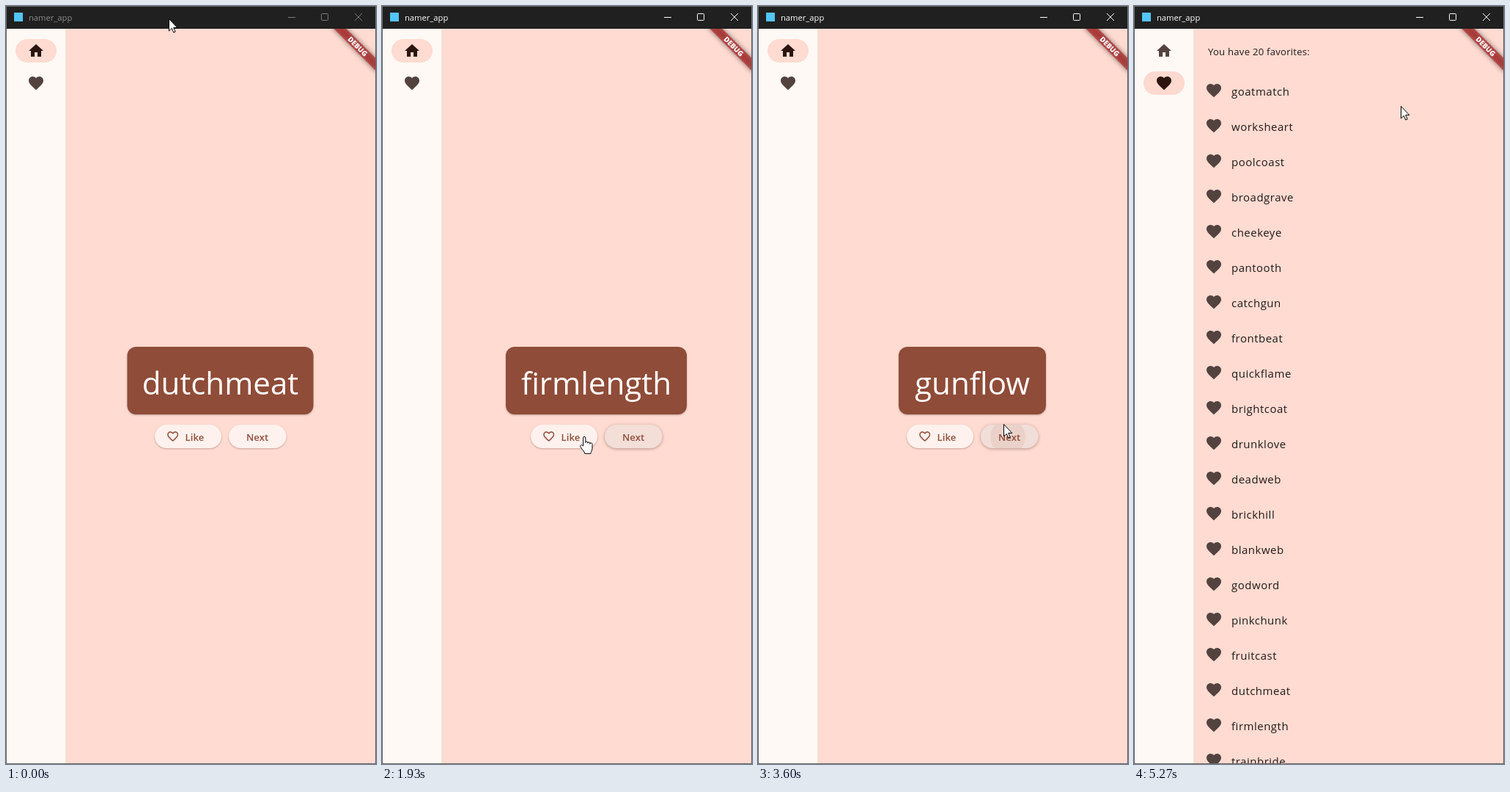
An HTML page for the animation above (7870 ms loop, 505 by 1032 pixels).

```html
<!DOCTYPE html>
<html lang="en">
<head>
<meta charset="utf-8">
<title>namer_app</title>
<style>
  html, body { margin: 0; width: 100%; height: 100%; overflow: hidden; background: #ffdbd1; }
  svg { display: block; width: 505px; height: 1032px; font-family: "Open Sans", "Noto Sans", sans-serif; }
  .btn { fill: #fff1ed; }
  .label { font-size: 13.1px; font-weight: 600; letter-spacing: .1px; fill: #8f4c38; }
  .item { font-size: 15px; letter-spacing: .5px; fill: #231917; }
  .cursor { fill: #fff; stroke: #000; stroke-width: 1; stroke-linejoin: round; }
</style>
</head>
<body>
<svg viewBox="0 0 505 1032" xmlns="http://www.w3.org/2000/svg">
  <defs>
    <path id="heart" d="M12 21.35l-1.45-1.32C5.4 15.36 2 12.28 2 8.5 2 5.42 4.42 3 7.5 3c1.74 0 3.41.81 4.5 2.09C13.09 3.81 14.76 3 16.5 3 19.58 3 22 5.42 22 8.5c0 3.78-3.4 6.86-8.55 11.54z"/>
    <path id="heartLine" d="M16.5 3c-1.74 0-3.41.81-4.5 2.09C10.91 3.81 9.24 3 7.5 3 4.42 3 2 5.42 2 8.5c0 3.78 3.4 6.86 8.55 11.54L12 21.35l1.45-1.32C18.6 15.36 22 12.28 22 8.5 22 5.42 19.58 3 16.5 3zm-4.4 15.55l-.1.1-.1-.1C7.14 14.24 4 11.39 4 8.5 4 6.5 5.5 5 7.5 5c1.54 0 3.04.99 3.57 2.36h1.87C13.46 5.99 14.96 5 16.5 5c2 0 3.5 1.5 3.5 3.5 0 2.89-3.14 5.74-7.9 10.05z"/>
    <filter id="soft" x="-50%" y="-200%" width="200%" height="500%"><feGaussianBlur stdDeviation="3.9"/></filter>
    <clipPath id="app"><rect x="1" y="31" width="503" height="1000"/></clipPath>
  </defs>

  <rect width="505" height="1032" fill="#ffdbd1"/>
  <rect x="1" y="30" width="80" height="1001" fill="#fff9f5"/>

  <rect id="homePill" x="13" y="45" width="56" height="32" rx="16" fill="#ffdbd1"/>
  <rect id="favPill" x="13" y="89" width="56" height="32" rx="16" fill="#ffdbd1"/>
  <g id="favInk"></g>
  <path id="homeIcon" transform="translate(29 49)" d="M10 20v-6h4v6h5v-8h3L12 3 2 12h3v8z"/>
  <use id="favIcon" href="#heart" x="29" y="93"/>

  <g id="homePage">
    <rect id="card" y="464" height="92" rx="12" fill="#8f4c38" style="filter:drop-shadow(0 1px 1px rgba(0,0,0,.28))"/>
    <text id="word" x="292.5" y="529" text-anchor="middle" font-size="42.1" fill="#fff"></text>
    <rect id="likeBtn" class="btn" x="203" y="570" width="91" height="32" rx="16"/>
    <rect id="nextBtn" class="btn" x="304" y="570" width="78.5" height="32" rx="16"/>
    <g id="likeInk"></g>
    <g id="nextInk"></g>
    <use id="likeIcon" transform="translate(218.7 577) scale(.75)" fill="#8f4c38"/>
    <text class="label" x="244.5" y="592">Like</text>
    <text class="label" x="328" y="592">Next</text>
  </g>

  <g id="favPage" clip-path="url(#app)">
    <text x="101" y="67" font-size="13.1" letter-spacing=".25" fill="#231917">You have 20 favorites:</text>
  </g>

  <g clip-path="url(#app)">
    <g transform="translate(504 31) rotate(45)">
      <rect x="-44" y="28" width="88" height="12" fill="#000" opacity=".5" filter="url(#soft)"/>
      <rect x="-44" y="28" width="88" height="12" fill="#b71c1c" opacity=".63"/>
      <text y="37.5" text-anchor="middle" font-size="9.7" font-weight="800" fill="#fff">DEBUG</text>
    </g>
  </g>

  <rect width="505" height="31" fill="#202020"/>
  <rect x="11" y="9" width="12" height="12" fill="#54c5f8"/>
  <text id="title" x="31" y="20" font-size="11.2">namer_app</text>
  <path id="controls" fill="none" d="M385 15.5h10M431.5 10.5h7a1 1 0 0 1 1 1v7a1 1 0 0 1-1 1h-7a1 1 0 0 1-1-1v-7a1 1 0 0 1 1-1zM476 10l10 10M486 10l-10 10"/>
  <rect x=".5" y=".5" width="504" height="1031" fill="none" stroke="#686868"/>

  <path id="arrow" class="cursor" d="M.5.5V17l3.8-3.6 2.5 5.7 2.4-1.1-2.5-5.5h5.1z"/>
  <path id="hand" class="cursor" d="M-1.4 13V2a1.6 1.6 0 0 1 3.2 0v6.4a1.5 1.5 0 0 1 3 .2v.6a1.5 1.5 0 0 1 3 .3v.8a1.6 1.6 0 0 1 3.2.3V16c0 3-1.6 4-2.2 7.4H.9C.3 20.300-3 17.800-5 14.400-6 12.500-4 10.800-2.800 12z"/>
</svg>
<script>
const LOOP = 7870, STEP = 200 / 3, LAST = 79;
const $ = id => document.getElementById(id);
const clamp = v => Math.max(0, Math.min(1, v));

function add(parent, tag, attrs, text) {
  const el = document.createElementNS('http://www.w3.org/2000/svg', tag);
  set(el, attrs);
  if (text) el.textContent = text;
  parent.append(el);
  return el;
}
function set(el, attrs) {
  for (const k in attrs) el.setAttribute(k, attrs[k]);
}
const show = (el, on) => el.style.display = on ? '' : 'none';

// Pointer path: step, x, y
const path = [
  [3, 222, 17], [5, 223, 40], [7, 226, 190], [9, 232, 430], [11, 238, 610], [12, 240, 630],
  [13, 242, 618], [14, 242, 601], [15, 243, 599], [16, 245, 591], [19, 246, 589], [20, 268, 588],
  [21, 298, 588], [22, 322, 587], [24, 338, 586], [28, 336, 586], [29, 276, 586], [30, 258, 586],
  [31, 274, 585], [32, 306, 583], [33, 313, 581], [35, 317, 580], [36, 315, 582], [37, 300, 584],
  [39, 262, 585], [42, 252, 583], [43, 262, 572], [44, 301, 503], [46, 325, 330], [47, 330, 285],
  [48, 330, 285], [50, 338, 530], [51, 340, 584], [53, 340, 587], [55, 330, 550], [58, 255, 310],
  [61, 152, 137], [63, 97, 102], [65, 56, 102], [66, 47, 104], [72, 45, 106], [75, 62, 108],
  [76, 120, 112], [77, 235, 123], [78, 335, 133], [79, 364, 136]
];
const words = [[0, 'dutchmeat', 254], [25, 'firmlength', 247], [35, 'trainbride', 233], [53, 'gunflow', 201]];
const liked = [[18, 25], [31, 35], [42, 53]];
const ACTIVE = 17, FAVORITES = 70;

const zones = {
  like: { x: 203, y: 570, w: 91, clicks: [17, 30, 41] },
  next: { x: 304, y: 570, w: 78.5, clicks: [24, 35, 53] },
  fav: { x: 13, y: 89, w: 56, clicks: [69] }
};

for (const id in zones) {
  const z = zones[id], g = $(id + 'Ink');
  const box = { x: z.x, y: z.y, width: z.w, height: 32, rx: 16 };
  add(add(g, 'clipPath', { id: id + 'Clip' }), 'rect', box);
  z.tint = add(g, 'rect', { ...box, fill: '#8f4c38' });
  z.ripple = add(add(g, 'g', { 'clip-path': `url(#${id}Clip)` }), 'circle', { fill: '#8f4c38' });
}

const favorites = ('goatmatch worksheart poolcoast broadgrave cheekeye pantooth catchgun frontbeat ' +
  'quickflame brightcoat drunklove deadweb brickhill blankweb godword pinkchunk fruitcast ' +
  'dutchmeat firmlength trainbride').split(' ');
favorites.forEach((name, i) => {
  add($('favPage'), 'use', { href: '#heart', x: 97, y: 103 + 48 * i, fill: '#53433f' });
  add($('favPage'), 'text', { class: 'item', x: 133, y: 122 + 48 * i }, name);
});

function pointer(n) {
  if (n <= path[0][0]) return path[0].slice(1);
  const i = path.findIndex(p => p[0] >= n);
  const [a, ax, ay] = path[i - 1], [b, bx, by] = path[i];
  const k = (n - a) / (b - a);
  return [Math.round(ax + (bx - ax) * k), Math.round(ay + (by - ay) * k)];
}

function over(id, n) {
  const [x, y] = pointer(n), z = zones[id];
  if (id === 'fav') return x < 81 && y > 85 && y < 130;
  return n < FAVORITES && x >= z.x && x <= z.x + z.w && y >= z.y && y <= z.y + 32;
}

function drawInk(id, n) {
  const z = zones[id];
  const hover = [1, 2, 3, 4].filter(d => over(id, n - d)).length / 4;
  const click = z.clicks.filter(c => c <= n).pop() ?? -99;
  const age = n - click;
  const press = clamp(1 - age / 8);
  set(z.tint, { opacity: .07 * hover + .07 * press });
  const [x, y] = pointer(Math.max(0, click));
  const grow = clamp(age / 3.4);
  set(z.ripple, {
    cx: x + (z.x + z.w / 2 - x) * grow,
    cy: y + (z.y + 16 - y) * grow,
    r: 14 + 34 * grow,
    opacity: .1 * clamp(1 - age / 5.6)
  });
  if (id !== 'fav') {
    const lift = Math.max(hover, press);
    $(id + 'Btn').style.filter =
      `drop-shadow(0 ${1 + .5 * lift}px ${1 + lift}px rgba(60,25,15,${.3 + .08 * lift}))`;
  }
}

function draw(n) {
  const active = n >= ACTIVE, favs = n >= FAVORITES;
  set($('title'), { fill: active ? '#fff' : '#8c8c8c' });
  set($('controls'), { stroke: active ? '#fff' : '#7c7c7c' });

  const [, word, width] = words.filter(w => w[0] <= n).pop();
  $('word').textContent = word;
  set($('card'), { x: 292.5 - width / 2, width });
  const full = liked.some(([a, b]) => n >= a && n < b);
  set($('likeIcon'), { href: full ? '#heart' : '#heartLine' });
  show($('homePage'), !favs);
  show($('favPage'), favs);

  const p = clamp((n - FAVORITES + 1) / 3), ease = 1 - (1 - p) ** 2;
  set($('homePill'), { opacity: 1 - p });
  set($('favPill'), { opacity: p, transform: `translate(${41 - 41 * ease} 0) scale(${ease} 1)` });
  set($('homeIcon'), { fill: favs ? '#53433f' : '#2c150f' });
  set($('favIcon'), { fill: favs ? '#2c150f' : '#53433f' });
  Object.keys(zones).forEach(id => drawInk(id, n));

  const [x, y] = pointer(n);
  const link = Object.keys(zones).some(id => over(id, n));
  show($('arrow'), !link);
  show($('hand'), link);
  set($(link ? 'hand' : 'arrow'), { transform: `translate(${x} ${y})` });
}

const startOf = n => 10 * Math.round(n * STEP / 10);
const origin = performance.now();
let shown = -1;

function tick() {
  const t = (performance.now() - origin) % LOOP;
  let n = Math.min(LAST, Math.ceil(t / STEP) + 1);
  while (n > 0 && startOf(n) > t) n--;
  if (n !== shown) draw(shown = n);
  requestAnimationFrame(tick);
}
tick();
</script>
</body>
</html>
```
